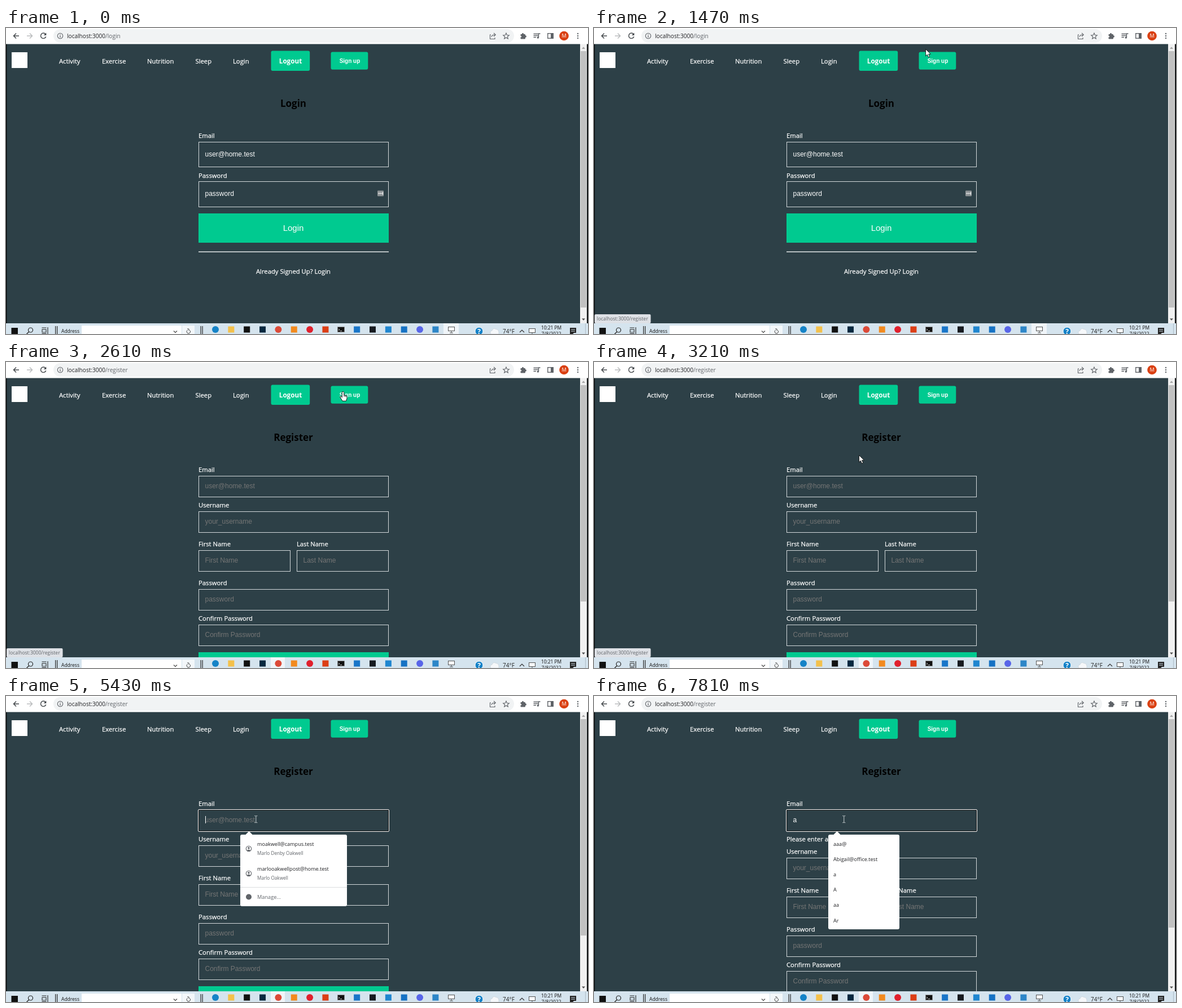
These frames come from a looping animation (1031 by 543 pixels, 8000 ms). An HTML page:

```html
<!DOCTYPE html>
<html lang="en">
<head>
<meta charset="utf-8">
<title>Login and register</title>
<style>
  html, body { margin: 0; width: 100%; height: 100%; overflow: hidden; background: #2d4047; }
  svg { display: block; width: 100vw; height: 100vh; }
  text { font-family: "Open Sans", "Noto Sans", sans-serif; white-space: pre; }
  .arial { font-family: "Liberation Sans", Arial, sans-serif; }
  .label { stroke: #fff; stroke-width: .25px; }
</style>
</head>
<body>
<svg id="stage" viewBox="0 0 1031 543" preserveAspectRatio="none"></svg>
<script>
const LOOP = 8000;
const PAGE = '#2d4047', GREEN = '#00ca90', INK = '#202124', GREY = '#5f6368', HINT = '#757575';

// Markup helpers
const rect = (x, y, w, h, fill, more = '') =>
  `<rect x="${x}" y="${y}" width="${w}" height="${h}" fill="${fill}" ${more}/>`;
const dot = (x, y, r, fill, more = '') => `<circle cx="${x}" cy="${y}" r="${r}" fill="${fill}" ${more}/>`;
const line = (d, color = GREY, width = 1.3, more = '') =>
  `<path d="${d}" fill="none" stroke="${color}" stroke-width="${width}" ${more}/>`;
const shape = (d, fill, more = '') => `<path d="${d}" fill="${fill}" ${more}/>`;
const text = (x, y, size, fill, str, more = '') =>
  `<text x="${x}" y="${y}" font-size="${size}" fill="${fill}" ${more}>${str}</text>`;
const group = (id, body, hidden = true) =>
  `<g id="${id}" ${hidden ? 'visibility="hidden"' : ''}>${body}</g>`;
const MID = 'text-anchor="middle"', BOLD = 'font-weight="700"', ARIAL = 'class="arial"';

const label = (x, y, str, more = '') => text(x, y, 11.25, '#fff', str, `class="label" ${more}`);
const box = (x, y, w, h) => rect(x + .5, y + .5, w - 1, h - 1, 'none', 'stroke="#d3d9db"');
const field = (x, y, w, name, hint) =>
  label(x, y - 7, name) + box(x, y, w, 38) + (hint ? text(x + 11.5, y + 22, 12, HINT, hint, ARIAL) : '');
const title = str => text(509, 140, 17, '#000', str, `${MID} ${BOLD}`);

function toolbar() {
  return rect(0, 0, 1031, 28.5, '#fff')
    + rect(84, 2, 816, 24, '#f1f3f4', 'rx="12"')
    + line('M23 14H13.5M18 9.5L13.5 14L18 18.5', '#45494d', 1.5)
    + line('M37 14H46.5M42 9.5L46.5 14L42 18.5', '#babcbe', 1.5)
    + line('M70 11A4.7 4.7 0 1 0 70.7 15.2', '#45494d', 1.5) + shape('M71.3 8.5V13H66.8Z', '#45494d')
    + dot(96, 14, 4.7, 'none', `stroke="${GREY}" stroke-width="1.1"`)
    + line('M96 13.3V17M96 11V12.2', GREY, 1.2)
    + `<text x="108" y="18" font-size="10.1" fill="${INK}">localhost:3000<tspan id="path" fill="${GREY}"></tspan></text>`
    + line('M859 12H857.5V19.5H866V17M860 16Q860.5 12 866 12M864 9L867.3 12L864 15', GREY, 1.1)
    + line('M886 9L887.5 12.6L891.3 12.9L888.4 15.3L889.3 19L886 17L882.7 19L883.6 15.3L880.7 12.9L884.5 12.6Z', GREY, 1.1)
    + rect(911.5, 11, 8.5, 8.5, GREY, 'rx="1"') + dot(915.5, 10.8, 1.7, GREY) + dot(920.3, 15, 1.7, GREY)
    + dot(911.7, 15.2, 1.4, '#fff')
    + line('M934.5 10.5H943M934.5 13.5H943M934.5 16.5H939M943.5 17V10H946.5', GREY, 1.3) + dot(942.3, 17, 1.7, GREY)
    + rect(959.7, 9.7, 9.6, 8.6, 'none', `stroke="${GREY}" stroke-width="1.4"`) + rect(965, 9.5, 4.5, 9, GREY)
    + dot(988.5, 14, 8.3, '#da4012') + text(988.5, 17.3, 9, '#fff', 'M', MID)
    + [10, 14, 18].map(y => dot(1013, y, 1.2, GREY)).join('');
}

function nav() {
  const links = [['Activity', 94], ['Exercise', 170], ['Nutrition', 250], ['Sleep', 335.5], ['Login', 402]];
  return rect(10, 43, 28, 28, '#fff')
    + links.map(([name, x]) => label(x, 63, name)).join('')
    + rect(469.5, 40.5, 68.7, 35.6, GREEN, 'rx="3"') + text(504, 63, 11.7, '#fff', 'Logout', `${MID} ${BOLD}`)
    + rect(575.5, 42.6, 65.8, 31.2, GREEN, 'rx="3"') + text(609, 62, 10, '#fff', 'Sign up', `${MID} ${BOLD} ${ARIAL}`);
}

function loginForm() {
  return title('Login')
    + label(341, 195, 'Email') + box(341, 202, 337, 45) + text(352.5, 228, 12, '#fff', 'user@home.test', ARIAL)
    + label(341, 266, 'Password') + box(341, 272, 337, 46) + text(352.5, 298, 12, '#fff', 'password', ARIAL)
    + rect(658, 288.5, 11, 10, '#8d9396', 'rx="1"')
    + [660.5, 663, 665.5].map(x => dot(x, 293.5, .9, '#fff')).join('') + rect(667, 291, 1, 5, '#fff')
    + rect(341, 329, 337, 52, GREEN) + text(509, 360, 15, '#fff', 'Login', `${MID} ${ARIAL}`)
    + rect(341, 396.5, 337, 1.5, '#e3e7e8')
    + label(509, 436, 'Already Signed Up? Login', MID);
}

function registerForm() {
  return title('Register') + field(341, 202, 337, 'Email', '')
    + text(352.5, 224, 12, HINT, 'user@home.test', `${ARIAL} id="hint"`)
    + group('focus',
        rect(341.5, 202.5, 336, 37, 'none', 'stroke="#101010"')
        + rect(340.5, 201.5, 338, 39, 'none', 'stroke="#fff" rx="1.5"'))
    + group('typed', text(352.5, 224, 12, '#fff', 'a', ARIAL) + label(341, 258, 'Please enter a valid email'))
    + group('lower',
        field(341, 265, 337, 'Username', 'your_username')
        + field(341, 334, 163, 'First Name', 'First Name')
        + field(515, 334, 163, 'Last Name', 'Last Name')
        + field(341, 403, 337, 'Password', 'password')
        + field(341, 466, 337, 'Confirm Password', 'Confirm Password')
        + rect(341, 515, 337, 52, GREEN), false);
}

const popup = (w, h) => rect(415, 246, w, h, '#fff', 'rx="3"') + shape('M424 246.5L430.5 240L437 246.5Z', '#fff');

function profiles() {
  const person = y => dot(430, y, 4.7, 'none', `stroke="${GREY}" stroke-width="1.1"`) + dot(430, y - 1.2, 1.7, GREY)
    + shape(`M426.8 ${y + 3}Q430 ${y - .2} 433.2 ${y + 3}Q430 ${y + 5.5} 426.8 ${y + 3}Z`, GREY);
  const entry = (y, mail, name) => person(y + 5) + text(445, y, 9.1, INK, mail) + text(445, y + 16, 8.2, GREY, name);
  return popup(189, 127)
    + entry(266, 'moakwell@campus.test', 'Marlo Denby Oakwell')
    + entry(310, 'marlooakwellpost@home.test', 'Marlo Oakwell')
    + rect(415, 339, 189, 1, '#dcdee0')
    + dot(430, 356.5, 5, GREY) + text(445, 360, 9.2, GREY, 'Manage...');
}

function history() {
  const entries = ['aaa@', 'Abigail@office.test', 'a', 'A', 'aa', 'Ar'];
  return popup(126, 168) + entries.map((str, i) => text(424, 266 + 27.1 * i, 9.1, INK, str)).join('');
}

function frameEdges() {
  return rect(1017, 28, 12, 496, '#f1f1f1')
    + `<rect id="thumb" x="1018" y="41" width="10" fill="#c1c1c1"/>`
    + shape('M1020 37L1023 33.5L1026 37Z', '#a3a3a3') + shape('M1020 515.5L1023 519L1026 515.5Z', '#505050')
    + rect(0, 28, 1.3, 496, '#000') + rect(1029, 28, 2, 496, '#101314');
}

function taskbar() {
  const apps = [
    ['o', '#1583c7'], ['s', '#f3c14b'], ['s', '#111'], ['s', '#06283f'], ['o', '#dc4a38'], ['s', '#f28a1e'],
    ['o', '#e0202d'], ['s', '#dc3e15'], ['', ''], ['s', '#1976c9'], ['s', '#161a20'], ['s', '#1f86d0'],
    ['s', '#1672c4'], ['o', '#5865e8'], ['s', '#2d86c8']];
  const icon = ([kind, color], i) => {
    const x = 371 + 27.85 * i;
    return kind === 'o' ? dot(x, 535, 6, color) : kind ? rect(x - 5.5, 529.5, 11, 11, color) : '';
  };
  const bars = x => rect(x, 529, 1.3, 14, '#333') + rect(x + 3, 529, 1.3, 14, '#333');
  const screen = (x, y) => rect(x - 5.5, y - 4.5, 11, 7, '#f7f9fa', 'stroke="#555"')
    + line(`M${x} ${y + 3}V${y + 6}M${x - 3} ${y + 6}H${x + 3}`, '#555', 1);
  return rect(0, 524, 1031, 19, '#d5e4ee')
    + `<rect id="active" y="524" height="19" fill="#f0f5f9"/>`
    + rect(9.5, 532, 11.5, 11, '#111')
    + dot(43.5, 536, 4, 'none', 'stroke="#222" stroke-width="1.2"') + line('M40.7 539L36.5 543', '#222', 1.3)
    + rect(64, 535, 7, 5, 'none', 'stroke="#222"') + line('M63.5 532H71.5M63.5 542.5H71.5M74 531V543', '#222', 1.1)
    + bars(87) + text(98, 541, 8.5, '#111', 'Address')
    + rect(134, 528, 177, 15, '#fff') + line('M297 537.5L300 540.5L303 537.5', '#444', 1.1)
    + rect(312, 528, 22, 15, '#f3f7fa')
    + line('M325.5 536.5A3.2 3.2 0 1 1 321.5 536.2M321 534H324V537', '#444', 1) + bars(344.5)
    + apps.map(icon).join('')
    + rect(587.5, 530.5, 12, 9, '#111', 'stroke="#888" stroke-width=".8"')
    + line('M589 534L591 535.5L589 537M592 537.5H595', '#fff', .8)
    + screen(789, 535)
    + dot(838, 538, 7, '#1482c8', 'stroke="#fff"') + text(838, 542.5, 12, '#fff', '?', `${MID} ${BOLD}`)
    + shape('M859 543Q856 538 861 537Q863 531.5 868 534.5Q874 535 873 543Z', '#f6f8fa', 'stroke="#c3ccd3" stroke-width=".6"')
    + text(880, 542.3, 10, '#222', '74°F')
    + line('M910 540L914 536L918 540', '#333', 1.2) + screen(932, 538)
    + text(966, 535, 8.4, '#111', '10:21 PM', MID) + text(966, 546, 8.4, '#111', '7/8/2022', MID)
    + shape('M999 532H1010V541H1006L1004 543H999Z', '#222') + line('M1001 535H1008M1001 538H1008', '#d5e4ee', 1)
    + rect(1026, 524, 1, 19, '#aebcc6');
}

const status = rect(1, 508, 99.5, 16, '#dee1e6', 'rx="2"') + text(5, 519, 8.5, GREY, 'localhost:3000/register');
const pointers =
  group('arrow', shape('M0 0V12.3L2.9 9.6L5 14.5L7.2 13.5L5.1 8.8H9Z', '#fff', 'stroke="#000" stroke-width=".8"'))
  + group('hand', shape('M0 0C1.2 0 1.7 .8 1.7 1.8V6L5.5 7Q7 7.4 7 9V12L5.6 16.7H-1L-4 11.7Q-5.8 9 -4.7 8.4T-1.7 10.2V1.8Q-1.7 0 0 0Z',
      '#fff', 'stroke="#000" stroke-width=".9"') + line('M1.7 6V9M3.6 6.6V9.3M5.4 7.2V9.8', '#000', .7))
  + group('beam', line('M-2.5 -6H-.6L0 -5.4L.6 -6H2.5M0 -5.4V5.4M-2.5 6H-.6L0 5.4L.6 6H2.5', '#c9d0d2', 1));

const stage = document.getElementById('stage');
stage.innerHTML = rect(0, 0, 1031, 543, PAGE) + nav()
  + group('login', loginForm()) + group('register', registerForm())
  + group('caret', rect(353, 213, 1, 13, '#fff'))
  + frameEdges() + group('status', status) + toolbar() + taskbar()
  + group('profiles', profiles()) + group('history', history())
  + group('click', dot(0, 0, 9, '#fff000', 'opacity=".62"')) + pointers;

const parts = {};
stage.querySelectorAll('[id]').forEach(node => parts[node.id] = node);

// Pointer steps: time, kind, x, y
const MOVES = [
  [0, '', 0, 0],
  [200, 'arrow', 875, 389], [270, 'arrow', 776, 215], [330, 'arrow', 703, 113],
  [610, 'arrow', 692, 107], [680, 'arrow', 674, 97], [740, 'arrow', 655, 85], [810, 'hand', 635, 69],
  [880, 'hand', 620, 55], [940, 'hand', 611, 46.5],
  [1210, 'hand', 607, 45], [1280, 'hand', 600, 43], [1340, 'arrow', 594, 41], [1410, 'arrow', 590, 39],
  [1470, 'arrow', 587.5, 37.5],
  [1880, 'arrow', 589, 41], [1940, 'hand', 593, 45], [2010, 'hand', 595, 48], [2080, 'hand', 596, 50],
  [2150, 'hand', 597, 51], [2220, 'hand', 597, 52.5],
  [3030, 'hand', 588, 60], [3100, 'arrow', 550, 92], [3150, 'arrow', 508, 130], [3210, 'arrow', 469.5, 165.5],
  [3280, 'arrow', 459, 181], [3350, 'arrow', 454, 190], [3420, 'arrow', 450, 198], [3490, 'beam', 448, 208],
  [3560, 'beam', 447, 208], [3950, 'beam', 444.5, 214], [4020, 'beam', 442.8, 218.7]];

// Visible spans per part
const SPANS = {
  login: [[0, 2610]],
  register: [[2610, LOOP]],
  status: [[1070, 1740], [2350, 3350]],
  click: [[1740, 1810], [2480, 2610], [4350, 4420]],
  focus: [[4350, LOOP]],
  caret: [[4350, 4880], [5430, 5970], [6490, 7020], [7280, 7810]],
  profiles: [[4480, 7280]],
  typed: [[7280, LOOP]],
  history: [[7280, LOOP]]
};

const show = (node, on) => node.setAttribute('visibility', on ? 'visible' : 'hidden');
const place = (node, x, y) => node.setAttribute('transform', `translate(${x} ${y})`);

function render(t) {
  for (const id in SPANS) show(parts[id], SPANS[id].some(([from, to]) => t >= from && t < to));

  const registered = t >= 2610, typed = t >= 7280;
  show(parts.lower, registered);
  show(parts.hint, registered && !typed);
  parts.path.textContent = registered ? '/register' : '/login';
  parts.thumb.setAttribute('height', typed ? 370 : registered ? 384 : 455);
  parts.active.setAttribute('x', t < 1740 ? 775 : 469);
  parts.active.setAttribute('width', t < 1740 ? 27 : 25);
  parts.status.setAttribute('opacity', t >= 2350 && t < 2420 ? .6 : 1);
  place(parts.lower, 0, typed ? 22 : 0);
  place(parts.caret, typed ? 6 : 0, 0);

  const [, kind, x, y] = MOVES.findLast(([start]) => t >= start);
  for (const id of ['arrow', 'hand', 'beam']) {
    show(parts[id], id === kind);
    place(parts[id], x, y);
  }
  place(parts.click, kind === 'beam' ? x - 1.8 : x, y - .5);
}

const begin = performance.now();
function tick() {
  render((performance.now() - begin) % LOOP);
  requestAnimationFrame(tick);
}
tick();
</script>
</body>
</html>
```
